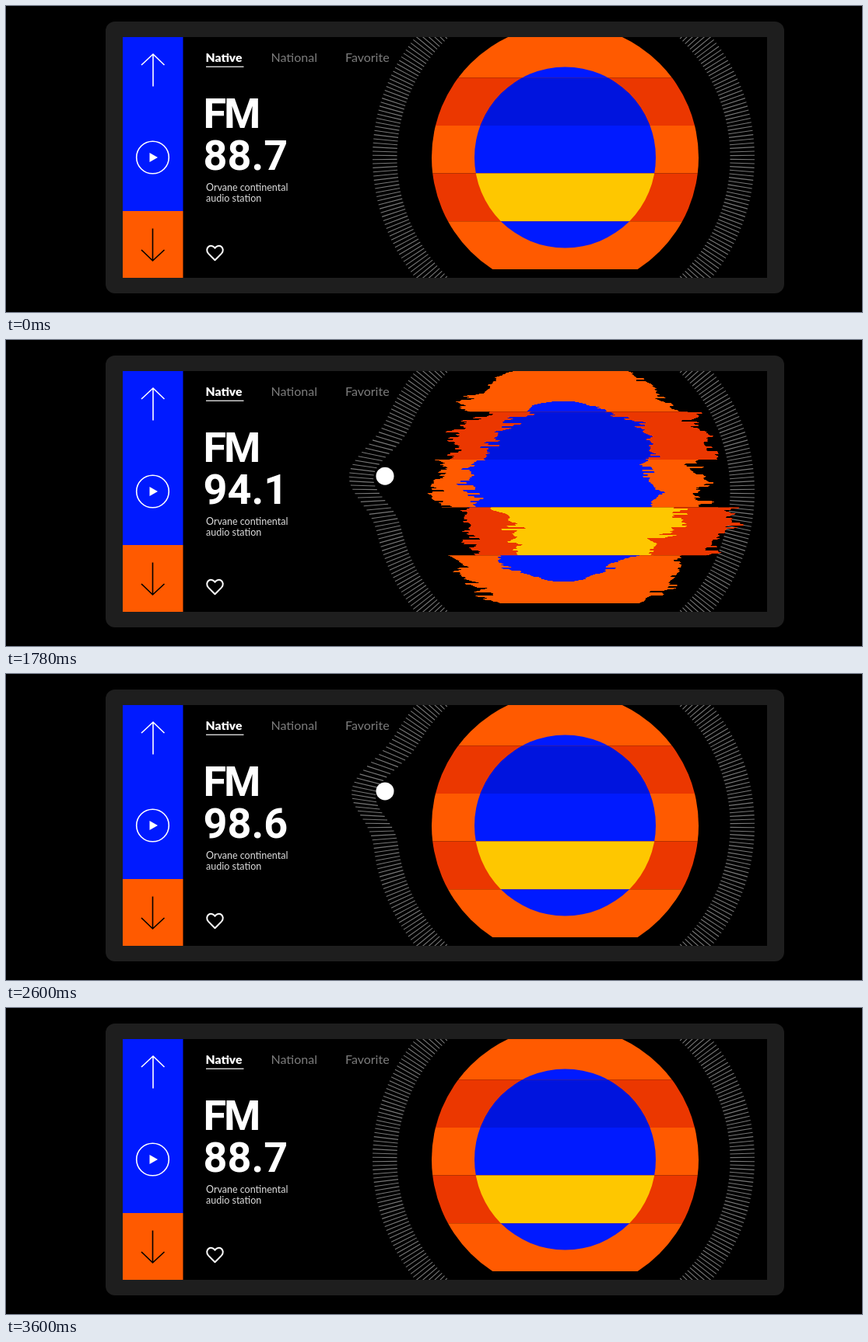
An HTML page with a canvas that plays this animation: 1100 px wide and 394 px high, repeating every 4200 ms.

```html
<!DOCTYPE html>
<html lang="en">
<head>
<meta charset="utf-8">
<title>Radio tuner</title>
<style>
  html, body { margin: 0; width: 100%; height: 100%; overflow: hidden; background: #000; }
  svg, canvas { position: absolute; left: 0; top: 0; width: 1100px; height: 394px; }
  text { fill: #fff; font-family: Lato, sans-serif; }
  .tab { font-size: 16px; }
  .off { fill: #7c7c7c; }
  .on { font-size: 15.6px; font-weight: 900; }
  .big { font: 700 54px Roboto, sans-serif; }
  .note { font-size: 12.5px; fill: #dcdcdc; }
  .line { fill: none; stroke: #fff; stroke-width: 1.6; }
  .dark { stroke: #000; }
  .heart { stroke-width: 2; stroke-linejoin: round; }
</style>
</head>
<body>
<svg viewBox="0 0 1100 394">
  <rect x="128" y="20" width="872" height="350" rx="12" fill="#1e1e1e"/>
  <rect x="150" y="40" width="828" height="310"/>
  <rect x="150" y="40" width="77.5" height="224" fill="#001aff"/>
  <rect x="150" y="264" width="77.5" height="86" fill="#ff5a00"/>

  <path class="line" d="M189 103.5V62M174 76L189 62L203.5 76"/>
  <circle class="line" cx="188.5" cy="195" r="20.8"/>
  <path d="M184.5 189L195 195L184.5 201Z" fill="#fff"/>
  <path class="line dark" d="M188.5 286.5V328M174 314L188.5 328L203.5 314"/>

  <text class="on" x="256.5" y="72">Native</text>
  <text class="tab off" x="340.5" y="72">National</text>
  <text class="tab off" x="436" y="72">Favorite</text>
  <rect x="257" y="77.5" width="48.5" height="1.5" fill="#ccc"/>

  <text class="big" x="253.5" y="156.5" letter-spacing="-3">FM</text>
  <text class="big" x="253.5" y="211" id="freq">88.7</text>
  <text class="note" x="257" y="237.5">Orvane continental</text>
  <text class="note" x="257" y="252">audio station</text>

  <path class="line heart" d="M268.5 327.3L260 318.6C257.4 315.8 257.8 311.8 260.3 309.9C262.9 308 266.4 308.6 268.5 311.8C270.6 308.6 274.1 308 276.7 309.9C279.2 311.8 279.6 315.8 277 318.6Z"/>
</svg>
<canvas id="dial" width="1100" height="394"></canvas>

<script>
const LOOP = 4200, STEP = 20;
const ctx = document.getElementById('dial').getContext('2d');
const freq = document.getElementById('freq');

// Smooth step from 0 to 1 between times a and b
function ease(t, a, b) {
  const p = Math.min(1, Math.max(0, (t - a) / (b - a)));
  return p * p * (3 - 2 * p);
}
// Rises during a..b and falls during c..d
const pulse = (t, a, b, c, d) => ease(t, a, b) - ease(t, c, d);

const knobY = t => 195 - 46 * pulse(t, 1280, 2380, 2530, 3105);
const station = t => 88.7 + 10 * pulse(t, 1400, 2125, 2575, 3010);
const grip = t => pulse(t, 820, 1220, 3100, 3490);
const bulge = t => grip(t) * (31 + 9 * ease(t, 2600, 2940));
const glitch = t => pulse(t, 1350, 1800, 2150, 2420) + pulse(t, 2610, 2880, 2970, 3250);

const hash = n => {
  const s = Math.sin(n * 127.1 + 11.7) * 43758.5453;
  return (s - Math.floor(s)) * 2 - 1;
};
const noise = x => {
  const i = Math.floor(x), k = ease(x, i, i + 1);
  return hash(i) * (1 - k) + hash(i + 1) * k;
};
// Ragged edge: slow waves, with spikes in some places only
const jitter = (y, seed) => 12 * noise(y / 15 + seed) + 5 * noise(y / 5 + seed * 3)
  + 20 * Math.abs(noise(y / 11 + seed * 5)) * hash(Math.floor(y / 2) + seed * 7);

const CX = 718.5, CY = 195, BAND = 61.7;
const cores = ['#001aff', '#0014de', '#001aff', '#fec700', '#001aff'];

function fillDisc(radius, color, top, drift, amp, seed, roll) {
  ctx.beginPath();
  if (amp < 0.005) {
    ctx.arc(CX, CY, radius, 0, 7);
  } else {
    for (let y = Math.floor(top); y < top + BAND; y++) {
      const d = y + 0.5 - CY;
      if (Math.abs(d) >= radius) continue;
      const half = Math.sqrt(radius * radius - d * d);
      const fit = amp * Math.min(1, half / 60);
      const x0 = CX - half + fit * (drift + jitter(y + roll, seed));
      const x1 = CX + half + fit * (drift + jitter(y + roll, seed + 40));
      if (x1 > x0) ctx.rect(x0, y, x1 - x0, 1);
    }
  }
  ctx.fillStyle = color;
  ctx.fill();
}

function drawDiscs(t) {
  const amp = glitch(t), roll = t / STEP * 3;
  cores.forEach((core, i) => {
    const odd = i % 2, top = 30.5 + BAND * i, shift = odd * (10 + 8 * i);
    ctx.save();
    ctx.beginPath();
    ctx.rect(150, top, 828, BAND);
    ctx.clip();
    fillDisc(171.5, odd ? '#eb3700' : '#ff5a00', top, shift + 5, amp, 100 + i * 9, roll);
    fillDisc(116.5, core, top, shift - 7, amp, 300 + i * 9, roll);
    ctx.restore();
  });
}

function drawTicks(t) {
  const push = bulge(t), at = knobY(t), reach = 78, count = 288;
  ctx.beginPath();
  for (let i = 0; i < count; i++) {
    const a = (i + 0.5) / count * Math.PI * 2, c = Math.cos(a), s = Math.sin(a);
    const off = (195 + 230 * s - at) / reach;
    const dx = c < 0 && Math.abs(off) < 1 ? push * Math.cos(off * Math.PI / 2) ** 3 : 0;
    ctx.moveTo(716.5 + 214 * c - dx, 195 + 214 * s);
    ctx.lineTo(716.5 + 245.5 * c - dx, 195 + 245.5 * s);
  }
  ctx.strokeStyle = '#777';
  ctx.lineWidth = 1.1;
  ctx.stroke();
}

function drawKnob(t) {
  ctx.globalAlpha = pulse(t, 200, 600, 3400, 3600);
  ctx.fillStyle = '#fff';
  ctx.beginPath();
  ctx.arc(487, knobY(t), 16.5 - 5 * grip(t), 0, 7);
  ctx.fill();
}

function draw() {
  const t = Math.floor(performance.now() % LOOP / STEP) * STEP;
  ctx.clearRect(0, 0, 1100, 394);
  ctx.save();
  ctx.beginPath();
  ctx.rect(150, 40, 828, 310);
  ctx.clip();
  drawTicks(t);
  drawDiscs(t);
  drawKnob(t);
  ctx.restore();
  freq.textContent = station(t).toFixed(1);
  requestAnimationFrame(draw);
}
draw();
</script>
</body>
</html>
```
